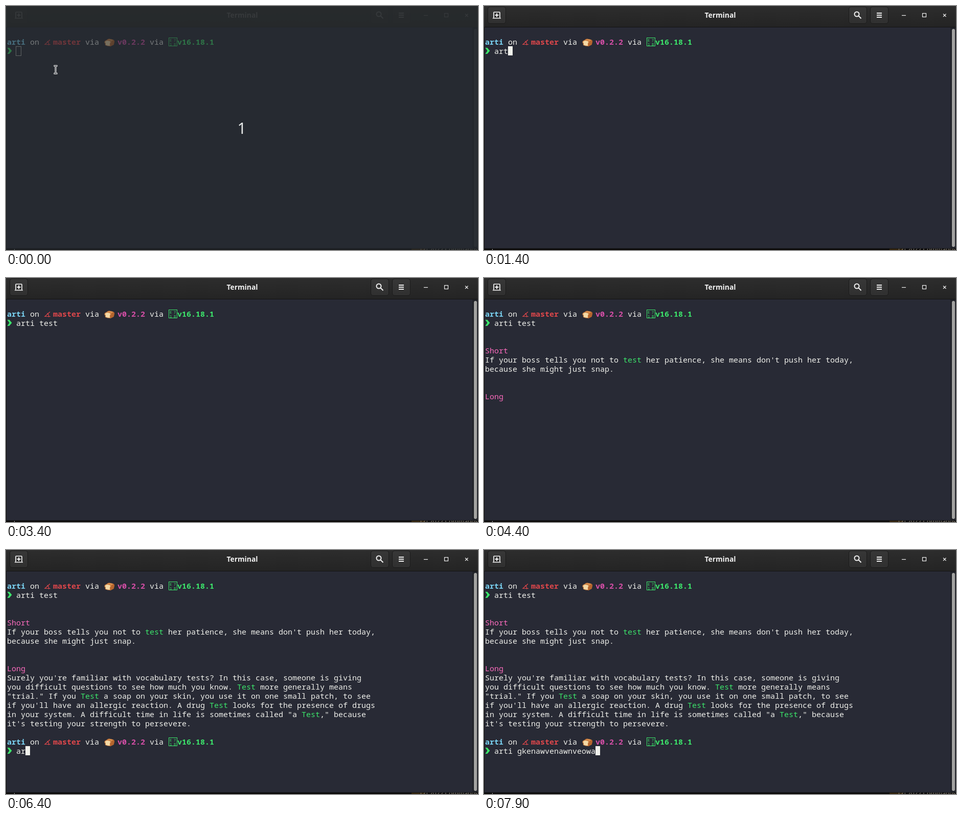
These frames come from a looping animation (923 by 479 pixels, 8 s). An HTML page:

```html
<!DOCTYPE html>
<html lang="en">
<head>
<meta charset="utf-8">
<title>Terminal</title>
<style>
  html, body { margin: 0; width: 100%; height: 100%; overflow: hidden; background: #000; }
  svg { display: block; width: 923px; height: 479px; }
  .mono { font: 15px "Noto Sans Mono", monospace; white-space: pre; }
  .bold { font-weight: 700; }
  .ui { font-family: "Noto Sans", sans-serif; }
</style>
</head>
<body>
<svg id="stage" viewBox="0 0 923 479" xmlns="http://www.w3.org/2000/svg">
  <defs>
    <linearGradient id="bar" x2="0" y2="1">
      <stop stop-color="#2d2d2d"/><stop offset="1" stop-color="#242424"/>
    </linearGradient>
    <linearGradient id="key" x2="0" y2="1">
      <stop stop-color="#373737"/><stop offset="1" stop-color="#303030"/>
    </linearGradient>
  </defs>

  <!-- strip of the window behind -->
  <rect width="923" height="479" fill="#0b0908"/>
  <rect x="793" y="476" width="27" height="3" fill="#33240c"/>
  <text class="ui" x="810" y="482" font-size="12" fill="#8c8577">[2] 2022 Commands</text>
  <rect x="16" y="477" width="1" height="2" fill="#aaa"/>

  <!-- window -->
  <rect x="1" y="41" width="922" height="435" fill="#282a35"/>
  <rect x="912" y="42" width="11" height="434" fill="#212329"/>
  <rect id="thumb" x="915" y="45" width="6" height="428" rx="3" fill="#a3a3a1"/>
  <rect y="475.5" width="923" height="1" fill="#17181c"/>
  <rect width="923" height="41" fill="url(#bar)"/>
  <rect y="41" width="923" height="1" fill="#131313"/>
  <g id="header">
    <g fill="url(#key)" stroke="#1b1b1b">
      <rect x="7.5" y="1.5" width="35" height="33" rx="4.5"/>
      <rect x="713.5" y="1.5" width="35" height="33" rx="4.5"/>
      <rect x="755.5" y="1.5" width="35" height="33" rx="4.5"/>
    </g>
    <g fill="none" stroke="#f2f2f2" stroke-width="2">
      <path d="M19 23V13q0-1 1-1h10q1 0 1 1v10M17 24h16" stroke-width="1.7"/>
      <path d="M25 14.500v7M21.500 18h7"/>
      <circle cx="729" cy="16" r="4.500"/>
      <path d="M732.500 19.500l5 5"/>
      <path d="M768 14h10M768 18h10M768 22h10"/>
      <path d="M817 18.500h8" stroke-width="1.200"/>
      <rect x="857.500" y="14.500" width="7" height="7" stroke-width="1.200"/>
      <path d="M898 15.500l5.500 5.500m0-5.500l-5.500 5.500" stroke-width="1.200"/>
    </g>
    <text class="ui bold" x="462" y="23" font-size="13.85" text-anchor="middle" fill="#f2f2f2">Terminal</text>
  </g>

  <g id="screen"></g>
  <rect id="cursor" width="9" height="18"/>
  <g id="countdown">
    <rect width="923" height="479" fill="#262b2f" opacity=".6"/>
    <rect width="923" height="42" fill="#272b2d" opacity=".62"/>
    <text class="ui" x="461" y="251" font-size="30" text-anchor="middle" fill="#e6e8e8">1</text>
  </g>
  <g id="pointer" fill="none">
    <path d="M-3.500-7.500h7M0-7.500v15M-3.500 7.500h7" stroke="#fff" stroke-width="3"/>
    <path d="M-3-7.500h6M0-7.500v15M-3 7.500h6" stroke="#20242a"/>
  </g>
</svg>
<script>
const LOOP = 8000, CELL = 9, ROW = 18, LEFT = 2, TOP = 43;
const C = { fg: '#f0f1ec', cyan: '#7ad3f3', red: '#df474b', purple: '#d74fa8', green: '#3ce56b', pink: '#fb6bbd' };
const $ = id => document.getElementById(id);
const colX = col => LEFT + col * CELL;
const rowY = row => TOP + row * ROW;

const label = (col, row, str, color = C.fg, bold = '') =>
  `<text class="mono ${bold}" x="${colX(col)}" y="${rowY(row) + 15}" fill="${color}">${str}</text>`;

// Words in braces are highlighted.
function line(row, str) {
  let col = 0;
  return str.split(/[{}]/).map((part, i) => {
    const out = label(col, row, part.trimEnd(), i % 2 ? C.green : C.fg);
    col += part.length;
    return out;
  }).join('');
}

const bread = `
  <path d="M197 67q1-3 5-2.500l7 1.500q4 1 3 5l-1 4q0 1-1 1.500l-6 3z" fill="#b5652e"/>
  <path d="M198 66q3-2 7-1l5 1.500-4 3-8-1z" fill="#d98d4b"/>
  <path d="M193 69q4-4 9-2 5 1 4 5l-2 1v6q-5 .5-10-2l-.5-4q-2-1-.5-4z" fill="#c77b3f"/>
  <path d="M194 70q3-3 7-1.500 4 1 3 3l-1 1.500v5q-4 0-8-1.500v-4q-2-1-1-2.500z" fill="#f4d9a6"/>`;

const missing = `
  <rect x="318.500" y="62.500" width="16" height="16" fill="none" stroke="${C.green}"/>
  <g font-family="DejaVu Sans Mono, monospace" font-size="7" fill="${C.green}">
    <text x="320" y="70">E</text><text x="328" y="70">7</text>
    <text x="320" y="77.500">1</text><text x="328" y="77.500">8</text>
  </g>`;

const prompt = row => `
  ${label(0, row, 'arti', C.cyan, 'bold')}${label(5, row, 'on')}
  ${label(10, row, 'master', C.red, 'bold')}${label(17, row, 'via')}
  ${label(24, row, 'v0.2.2', C.purple, 'bold')}${label(31, row, 'via')}
  ${label(37, row, 'v16.18.1', C.green, 'bold')}
  <g transform="translate(0 ${rowY(row) - 61})">
    <path d="M86 66.500L76 75.500H87M80.500 69q4 3 3 8" fill="none" stroke="${C.red}" stroke-width="1.200"/>
    ${bread}${missing}
    <path d="M2.500 82h4l5 6-5 6h-4l4-6z" fill="${C.green}"/>
  </g>`;

const short = label(0, 5, 'Short', C.pink) + label(0, 10, 'Long', C.pink) +
  line(6, "If your boss tells you not to {test} her patience, she means don't push her today,") +
  line(7, 'because she might just snap.');

const long = [
  "Surely you're familiar with vocabulary tests? In this case, someone is giving",
  'you difficult questions to see how much you know. {Test} more generally means',
  '"trial." If you {Test} a soap on your skin, you use it on one small patch, to see',
  "if you'll have an allergic reaction. A drug {Test} looks for the presence of drugs",
  'in your system. A difficult time in life is sometimes called "a {Test}," because',
  "it's testing your strength to persevere."
].map((str, i) => line(11 + i, str)).join('');

$('screen').innerHTML = `
  ${prompt(1)}
  <text id="first" class="mono" x="20" y="${rowY(2) + 15}" fill="${C.fg}"></text>
  <g id="short">${short}</g>
  <g id="long">${long}</g>
  <g id="again">${prompt(18)}</g>
  <text id="second" class="mono" x="20" y="${rowY(19) + 15}" fill="${C.fg}"></text>`;

// Each key list holds [time, characters typed so far].
const first = { text: 'arti test', keys: [[1100, 1], [1200, 2], [1400, 3], [1600, 4], [1700, 5], [2000, 6], [2300, 7], [2600, 8], [2800, 9]] };
const second = { text: 'arti gkenawvenawnveowa', keys: [[6400, 2], [6600, 3], [6800, 4], [7300, 5], [7500, 8], [7600, 12], [7700, 15], [7800, 19], [7900, 22]] };
const blinkOff = [[900, 1100], [3400, 3600], [4200, 4800], [5300, 5900]];
const path = [[300, 97, 125], [600, 137, 156], [5200, 137, 156], [5400, 142, 199], [6000, 148, 347], [6100, 148, 347], [6200, 157, 355]];

const typed = (cmd, t) => cmd.keys.reduce((n, [at, len]) => t >= at ? len : n, 0);
const show = (id, on) => $(id).setAttribute('display', on ? 'inline' : 'none');
const within = (t, [a, b]) => t >= a && t < b;

function pointerAt(t) {
  const i = path.findIndex(p => p[0] > t);
  if (i === 0) return path[0].slice(1);
  if (i < 0) return path[path.length - 1].slice(1);
  const [a, ax, ay] = path[i - 1], [b, bx, by] = path[i], k = (t - a) / (b - a);
  return [Math.round(ax + (bx - ax) * k), Math.round(ay + (by - ay) * k)];
}

function setCursor(t, n1, n2) {
  let x = colX(2 + n1), y = rowY(2);
  if (t >= 4800) [x, y] = [colX(2 + n2), rowY(19)];
  else if (t >= 3900) [x, y] = [colX(0), rowY(3)];
  const hollow = t < 300, el = $('cursor');
  el.setAttribute('x', hollow ? x - .5 : x);
  el.setAttribute('y', hollow ? y + .5 : y);
  el.setAttribute('width', hollow ? 10 : CELL);
  el.setAttribute('fill', hollow ? 'none' : C.fg);
  el.setAttribute('stroke', hollow ? '#b9bdb5' : 'none');
  show('cursor', !blinkOff.some(span => within(t, span)));
}

function draw(ms) {
  const t = Math.floor(ms % LOOP / 100) * 100;
  const n1 = typed(first, t), n2 = typed(second, t);
  const focus = Math.min(1, Math.max(0, (t - 200) / 400));
  $('header').setAttribute('opacity', .5 + .5 * focus);
  $('thumb').setAttribute('opacity', .15 + .85 * focus);
  $('first').textContent = first.text.slice(0, n1);
  $('second').textContent = second.text.slice(0, n2);
  show('short', t >= 4400);
  show('long', t >= 4700);
  show('again', t >= 4800);
  show('countdown', t < 100);
  show('pointer', t < 1100 || within(t, [5200, 6400]));
  $('pointer').setAttribute('transform', `translate(${pointerAt(t).join(' ')})`);
  setCursor(t, n1, n2);
}

const start = performance.now();
function tick() {
  draw(performance.now() - start);
  requestAnimationFrame(tick);
}
draw(0);
requestAnimationFrame(tick);
</script>
</body>
</html>
```
